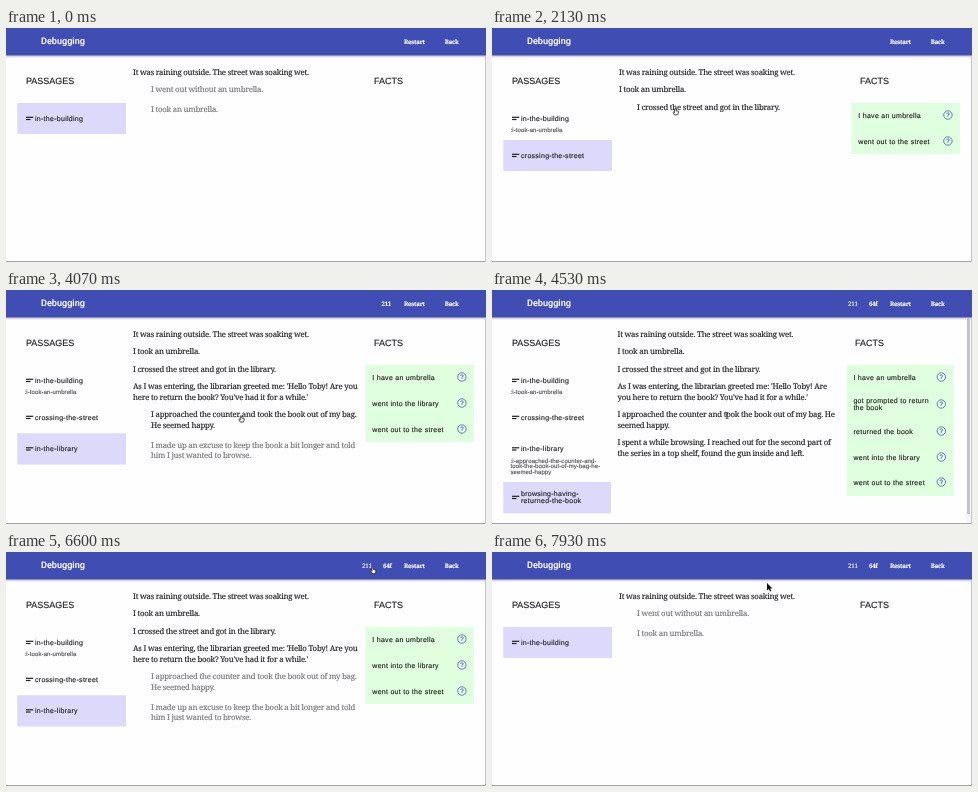
These frames come from a looping animation (480x234 px, 8 s). An HTML page with a canvas:

```html
<!DOCTYPE html>
<html lang="en">
<head>
<meta charset="utf-8">
<title>Debugging</title>
<style>
html, body { margin: 0; width: 100%; height: 100%; overflow: hidden; background: #fefdff; }
canvas { display: block; width: 480px; height: 234px; }
</style>
</head>
<body>
<canvas id="stage"></canvas>
<script>
const W = 480, H = 234, LOOP = 8000;
const SANS = '"Liberation Sans", Arial, sans-serif';
const TITLE = 'Roboto, sans-serif';
const SERIF = '"Noto Serif", serif';
const INK = '#222', BLUE = '#4c59b8';
const canvas = document.getElementById('stage');
const ctx = canvas.getContext('2d');
const ratio = window.devicePixelRatio || 1;
canvas.width = W * ratio;
canvas.height = H * ratio;

const RAIN = 'It was raining outside. The street was soaking wet.';
const TOOK = 'I took an umbrella.';
const CROSSED = 'I crossed the street and got in the library.';
const building = { y: 90, label: ['in-the-building'] };
const buildingDone = { ...building, sub: [':i-took-an-umbrella'], subY: 102 };
const street = { y: 127, label: ['crossing-the-street'] };
const library = { y: 158.5, label: ['in-the-library'] };
const umbrella = 'I have an umbrella', inside = 'went into the library', outside = 'went out to the street';

// Lines are [text, middle y]; options carry the lines of one choice each.
const scenes = {
  start: {
    passages: [building], mark: [75, 31],
    lines: [[RAIN, 44]],
    options: [[['I went out without an umbrella.', 61.5]], [[TOOK, 81]]],
    facts: []
  },
  street: {
    passages: [buildingDone, street], mark: [112, 31],
    lines: [[RAIN, 44], [TOOK, 61.5]],
    options: [[[CROSSED, 79]]],
    facts: [[87, umbrella], [113, outside]], factsEnd: 126
  },
  library: {
    passages: [buildingDone, street, library], mark: [143.3, 31.2],
    lines: [[RAIN, 44], [TOOK, 61.5], [CROSSED, 79],
      ["As I was entering, the librarian greeted me: 'Hello Toby! Are you", 96.5],
      ["here to return the book? You've had it for a while.'", 107]],
    options: [
      [['I approached the counter and took the book out of my bag.', 124.5], ['He seemed happy.', 135]],
      [['I made up an excuse to keep the book a bit longer and told', 155], ['him I just wanted to browse.', 165.5]]],
    facts: [[87, umbrella], [113, inside], [139, outside]], factsEnd: 152
  },
  browse: {
    narrow: true,
    passages: [buildingDone, street,
      { ...library, subY: 170.7, sub: [':i-approached-the-counter-and-', 'took-the-book-out-of-my-bag-he-', 'seemed-happy'] },
      { y: 207, label: ['browsing-having-', 'returned-the-book'] }],
    mark: [192, 31.3],
    lines: [[RAIN, 44], [TOOK, 61.5], [CROSSED, 79],
      ["As I was entering, the librarian greeted me: 'Hello Toby! Are", 96.5],
      ["you here to return the book? You've had it for a while.'", 107],
      ['I approached the counter and took the book out of my bag. He', 124.5], ['seemed happy.', 135],
      ['I spent a while browsing. I reached out for the second part of', 152.5],
      ['the series in a top shelf, found the gun inside and left.', 163]],
    options: [],
    facts: [[87, umbrella], [114, 'got prompted to return', 'the book'], [141, 'returned the book'], [167, inside], [192, outside]],
    factsEnd: 206
  }
};

const sceneCues = [[0, 'start'], [1850, 'street'], [2480, 'library'], [4270, 'browse'],
  [5720, 'start'], [6040, 'browse'], [6300, 'library'], [6800, 'start']];
const hoverCues = [[0, -1], [1550, 1], [1850, -1], [2050, 0], [2480, -1], [3800, 0], [4270, -1]];
const pointerCues = [[0, 'none'], [70, 'arrow'], [1550, 'hand'], [1850, 'arrow'], [2050, 'hand'], [2480, 'beam'],
  [3100, 'arrow'], [3800, 'hand'], [4270, 'beam'], [4800, 'arrow'], [5380, 'hand'], [6800, 'arrow']];
const path = [[70, 482, 205], [850, 235, 125], [1250, 196, 92], [1420, 196, 92], [1650, 186, 83],
  [1900, 185, 82], [2200, 183, 80], [2870, 183, 80], [3300, 195, 108], [4000, 235, 125.5],
  [4750, 235, 125.5], [5450, 409.3, 13], [5700, 409.3, 13], [6020, 381, 14], [6180, 381, 14],
  [6400, 366.7, 15], [6760, 366.7, 15], [7300, 302, 27], [7930, 275, 31]];

const at = (cues, t) => cues.filter(c => c[0] <= t).pop()[1];

function cursorAt(t) {
  const i = path.findIndex(p => p[0] > t);
  if (i <= 0) return path[i === 0 ? 0 : path.length - 1].slice(1);
  const [a, b] = [path[i - 1], path[i]];
  const k = (t - a[0]) / (b[0] - a[0]);
  const e = k * k * (3 - 2 * k);
  return [a[1] + (b[1] - a[1]) * e, a[2] + (b[2] - a[2]) * e];
}

// A hairline stroke gives the type a slightly heavier cut.
function text(str, x, y, size, family, color, { weight = 400, spacing = 0 } = {}) {
  ctx.font = `${weight} ${size}px ${family}`;
  ctx.letterSpacing = spacing + 'px';
  ctx.textRendering = 'geometricPrecision';
  ctx.fillStyle = ctx.strokeStyle = color;
  ctx.lineWidth = 0.15;
  ctx.fillText(str, x, y + size * 0.35);
  ctx.strokeText(str, x, y + size * 0.35);
}

const label = (str, x, y) => text(str, x, y, 7, SANS, INK, { spacing: 0.28 });
const prose = (str, x, y, color) => text(str, x, y, 7.8, SERIF, color, { spacing: -0.21 });

function rect(x, y, w, h, color) {
  ctx.fillStyle = color;
  ctx.fillRect(x, y, w, h);
}

function header(t) {
  const shade = ctx.createLinearGradient(0, 27, 0, 30);
  shade.addColorStop(0, 'rgba(40,40,70,.35)');
  shade.addColorStop(1, 'rgba(40,40,70,0)');
  rect(0, 27, W, 3, shade);
  rect(0, 0, W, 27.4, '#404db3');
  text('Debugging', 35, 13.2, 9.1, TITLE, '#fff', { weight: 500 });
  const link = (str, x, weight = 600) => text(str, x, 13.6, 6.1, SERIF, '#fff', { weight, spacing: weight > 400 ? -0.25 : -0.1 });
  if (t >= 4270) {
    link('211', 356, 400);
    link('64f', 377);
  } else if (t >= 2480) {
    link('211', 375.5);
  }
  link('Restart', 398);
  link('Back', 438.8);
}

function passages(scene) {
  text('PASSAGES', 20, 53.2, 9, SANS, INK);
  rect(11.3, scene.mark[0], scene.narrow ? 107.7 : 108.7, scene.mark[1], '#dcd9fb');
  for (const p of scene.passages) {
    rect(20, p.y - 1.3, 7.3, 1.2, INK);
    rect(20, p.y + 0.9, 4.5, 1.2, INK);
    const top = p.y + 0.2 - (p.label.length - 1) * 3.5;
    p.label.forEach((s, i) => label(s, 29, top + i * 7));
    (p.sub || []).forEach((s, i) => text(s, 18.5, p.subY + i * 5.6, 6, SANS, '#555', { spacing: 0.1 }));
  }
}

function story(scene, hover) {
  const x = scene.narrow ? 125.5 : 127;
  for (const [s, y] of scene.lines) prose(s, x, y, INK);
  scene.options.forEach((lines, i) => {
    for (const [s, y] of lines) prose(s, 145, y, i === hover ? INK : '#777');
  });
}

function facts(scene) {
  const x = scene.narrow ? 354.6 : 359.5;
  text('FACTS', x + 8.5, 53.2, 9, SANS, INK);
  if (!scene.facts.length) return;
  rect(x, 74.7, scene.narrow ? 107.2 : 108.4, scene.factsEnd - 74.7, '#dfffdf');
  for (const [y, ...lines] of scene.facts) {
    const top = y + 0.2 - (lines.length - 1) * 3.5;
    lines.forEach((s, i) => label(s, x + 6.8, top + i * 7));
    const cx = x + (scene.narrow ? 94.7 : 96.4);
    text('?', cx - 1.75, y + 0.1, 6.3, SANS, BLUE);
    ctx.lineWidth = 0.8;
    ctx.beginPath();
    ctx.arc(cx, y, 4.2, 0, 7);
    ctx.stroke();
  }
}

function chrome(scene, t) {
  rect(0, 233, W, 1, '#a3a2a7');
  rect(479, 28, 1, 206, '#c6c5ca');
  if (scene.narrow) {
    rect(474, 28, 5, 205, '#f8f7f9');
    rect(475, 28, 3, 196, '#c4c3c6');
  }
  if (t >= 5430 && t < 5850) {
    rect(0, 226, 160, 8, '#a9a9ac');
    rect(0, 226.7, 159.3, 7.3, '#e9e9eb');
    text('localhost:3000/ide.html', 1.5, 230.4, 5.3, SANS, INK);
  }
}

const arrow = new Path2D('M0 0V7.6L1.8 6L3 8.6L4.3 8L3.1 5.5H5.4Z');
const hand = new Path2D('M-.7.6Q0-.4.7.6V2.4L3.1 3V5L2.4 6.6H-.7L-2.2 4L-1.6 3.5L-.7 4.3Z');
const beam = new Path2D('M-1.4-3.2L0-2.6L1.4-3.2M0-2.6V2.6M-1.4 3.2L0 2.6L1.4 3.2');

function pointer(t) {
  const kind = at(pointerCues, t);
  if (kind === 'none') return;
  const [x, y] = cursorAt(t);
  ctx.save();
  ctx.translate(x, y);
  if (t >= 1260 && t < 1440) {
    ctx.beginPath();
    ctx.arc(0.4, 0, 8.7, 0, 7);
    ctx.strokeStyle = '#111';
    ctx.lineWidth = 1.6;
    ctx.stroke();
  }
  ctx.lineWidth = 0.8;
  if (kind === 'beam') {
    ctx.strokeStyle = INK;
    ctx.stroke(beam);
  } else if (kind === 'hand') {
    ctx.fillStyle = '#fff';
    ctx.strokeStyle = INK;
    ctx.fill(hand);
    ctx.stroke(hand);
  } else {
    ctx.fillStyle = '#111';
    ctx.strokeStyle = '#fff';
    ctx.stroke(arrow);
    ctx.fill(arrow);
  }
  ctx.restore();
}

function draw() {
  const t = performance.now() % LOOP;
  const scene = scenes[at(sceneCues, t)];
  ctx.setTransform(ratio, 0, 0, ratio, 0, 0);
  rect(0, 0, W, H, '#fefdff');
  passages(scene);
  story(scene, at(hoverCues, t));
  facts(scene);
  header(t);
  chrome(scene, t);
  pointer(t);
  requestAnimationFrame(draw);
}
draw();
</script>
</body>
</html>
```
